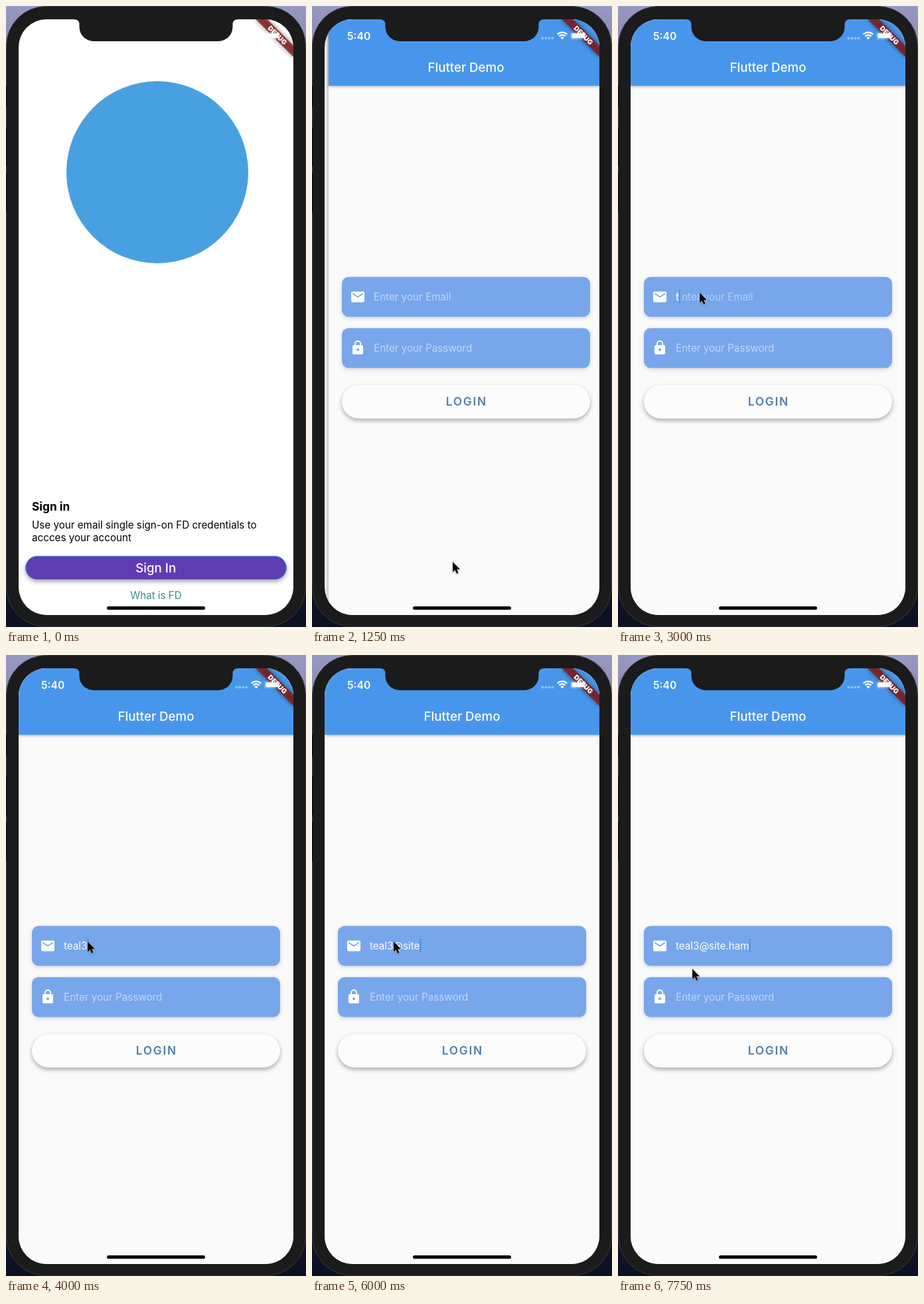
Animation of 452 by 934 pixels, one loop 8000 ms. Source, as an HTML page:

```html
<!DOCTYPE html>
<html lang="en">
<head>
<meta charset="utf-8">
<title>Sign-in flow</title>
<style>
  html, body { margin: 0; width: 100%; height: 100%; overflow: hidden; background: #14141c; }
  svg { display: block; width: 452px; height: 934px; }
  text { font-family: Inter, "Liberation Sans", sans-serif; font-size: 15.2px; white-space: pre; }
  .mid { text-anchor: middle; }
  .title { font-size: 18.7px; font-weight: 500; fill: #fff; }
  .field { fill: #78a6eb; filter: drop-shadow(0 2px 3px rgba(0, 0, 0, .15)); }
  .hint { fill: #fff; fill-opacity: .54; }
  .raised { filter: drop-shadow(0 3px 3px rgba(0, 0, 0, .32)); }
  .bar { filter: drop-shadow(0 1px 2px rgba(0, 0, 0, .32)); }
  .edge { filter: blur(4px); }
  .ribbon-shadow { filter: blur(3.5px); }
  .cursor { filter: drop-shadow(0 1px 1px rgba(0, 0, 0, .3)); }
</style>
</head>
<body>
<svg viewBox="0 0 452 934">
  <defs>
    <linearGradient id="wall" x2="0" y2="1">
      <stop stop-color="#9899c2"/>
      <stop offset=".5" stop-color="#30324f"/>
      <stop offset="1" stop-color="#0c1023"/>
    </linearGradient>
    <clipPath id="screen"><rect x="19" y="20" width="414" height="896" rx="42"/></clipPath>
    <clipPath id="pill"><rect x="29" y="827" width="394" height="36" rx="18"/></clipPath>
  </defs>

  <!-- Phone body -->
  <rect width="452" height="934" fill="url(#wall)"/>
  <rect x=".5" y=".5" width="451" height="933" rx="60" fill="#1b1b1c" stroke="#3b3b3e"/>
  <path d="M.5 120v32M.5 183v58M.5 251v59" stroke="#08080a" stroke-width="1.5"/>

  <g clip-path="url(#screen)">
    <g id="welcome">
      <rect x="19" y="20" width="414" height="896" fill="#fff"/>
      <circle cx="228" cy="250" r="137" fill="#48a0e1"/>
      <text x="39" y="759" style="font-size:17.3px;font-weight:700">Sign in</text>
      <text x="39" y="786">Use your email single sign-on FD credentials to</text>
      <text x="39" y="805">accces your account</text>
      <rect id="signIn" class="raised" x="29.5" y="827.5" width="393" height="35" rx="17.5" stroke="#459bea"/>
      <circle id="splash" cx="217" cy="838" r="11" fill="#fff" fill-opacity=".1" clip-path="url(#pill)"/>
      <text class="mid title" x="225.7" y="852">Sign In</text>
      <text class="mid" x="226" y="892" fill="#3a8f88">What is FD</text>
    </g>

    <g id="login">
      <rect class="edge" x="19" y="20" width="414" height="896" fill-opacity=".45"/>
      <rect x="19" y="20" width="414" height="896" fill="#fafafa"/>
      <rect class="bar" x="19" y="10" width="420" height="110" fill="#4896eb"/>
      <text class="mid title" x="226" y="99">Flutter Demo</text>

      <rect class="field" x="39" y="407.5" width="374" height="60" rx="10"/>
      <path transform="translate(51 425.5)" fill="#fff" d="M4 4h16a2 2 0 0 1 2 2v12a2 2 0 0 1-2 2H4a2 2 0 0 1-2-2V6a2 2 0 0 1 2-2zm16 4V6l-8 5-8-5v2l8 5z"/>
      <text id="emailHint" class="hint" x="87" y="443">Enter your Email</text>
      <text id="email" x="87" y="443" fill="#fff"></text>
      <rect id="caret" y="427" width="2" height="20" fill="#4594ee"/>

      <rect class="field" x="39" y="484.5" width="374" height="60" rx="10"/>
      <path transform="translate(51 502)" fill="#fff" fill-rule="evenodd" d="M18 8h-1V6A5 5 0 0 0 7 6v2H6a2 2 0 0 0-2 2v10a2 2 0 0 0 2 2h12a2 2 0 0 0 2-2V10a2 2 0 0 0-2-2zm-6 9a2 2 0 1 1 0-4 2 2 0 0 1 0 4zm3.1-9H8.9V6a3.1 3.1 0 0 1 6.2 0z"/>
      <text class="hint" x="87" y="520">Enter your Password</text>

      <rect class="raised" x="39" y="570" width="374" height="50.5" rx="25.2" fill="#fcfcfc"/>
      <text class="mid" x="226.8" y="601" fill="#527daa" style="font-size:17.3px;font-weight:600;letter-spacing:1.7px">LOGIN</text>
    </g>

    <!-- Debug ribbon -->
    <g transform="translate(433 20) rotate(45)">
      <rect class="ribbon-shadow" x="-40" y="28" width="80" height="12" fill-opacity=".5"/>
      <rect x="-40" y="28" width="80" height="12" fill="#871919" fill-opacity=".8"/>
      <text class="mid" y="37.7" fill="#fff" style="font-size:10.2px;font-weight:900">DEBUG</text>
    </g>

    <!-- Status bar -->
    <g fill="#fff">
      <text x="53" y="50.5" style="font-size:15.6px;font-weight:600">5:40</text>
      <g fill-opacity=".4">
        <circle cx="347.5" cy="48.5" r="2"/><circle cx="352.5" cy="48.5" r="2"/>
        <circle cx="357.5" cy="48.5" r="2"/><circle cx="362.5" cy="48.5" r="2"/>
      </g>
      <path d="M377 50.5l-2.6-2.7a3.7 3.7 0 0 1 5.2 0z"/>
      <path d="M372.4 45.6a6.5 6.5 0 0 1 9.2 0M369.7 42.6a10.3 10.3 0 0 1 14.6 0" fill="none" stroke="#fff" stroke-width="2.2"/>
      <rect x="389.5" y="39.5" width="23" height="10.5" rx="3" fill="none" stroke="#fff" stroke-opacity=".35"/>
      <rect x="391" y="41" width="20" height="7.6" rx="1.8"/>
    </g>
    <rect x="152" y="903" width="148" height="5" rx="2.5"/>
  </g>

  <path fill="#1b1b1c" d="M102 18v2q8.500 0 8.500 8v3.500a21.500 21.500 0 0 0 21.500 21.500h188a21.500 21.500 0 0 0 21.500-21.500V28q0-8 8.500-8v-2z"/>
  <path id="cursor" class="cursor" d="M0 0v15.500l3.600-3.300 2.400 5.500 2.600-1.100-2.400-5.400h4.900z" stroke="#fff" stroke-width="1" paint-order="stroke"/>
</svg>

<script>
const LOOP = 8000;
const EMAIL = "teal3@site.ham";

// Each track is a list of [start in ms, value]; values hold until the next step.
const pointer = [
  [0, null], [250, [276, 867]], [500, [232, 887]], [750, [212, 847]], [1000, [212, 836]],
  [1500, [175, 653]], [1750, [125, 440]], [2000, [123, 431]], [7750, [112, 472]]
];
const pressed = [[0, false], [1000, true]];
const pageShift = [[0, null], [1250, 6], [1500, 0]];
const typed = [
  [0, 0], [3000, 1], [3250, 2], [3500, 4], [4000, 5], [5000, 6], [5500, 8],
  [5750, 9], [6000, 10], [6500, 11], [7000, 13], [7250, 14]
];
const hintOpacity = [[0, 1], [3000, .8], [3250, 0]];
const focused = [[0, false], [2250, true]];

const $ = id => document.getElementById(id);
const valueAt = (track, t) => track.findLast(([start]) => start <= t)[1];
const show = (el, on) => el.setAttribute("visibility", on ? "visible" : "hidden");
const move = (el, x, y) => el.setAttribute("transform", `translate(${x} ${y})`);

function render(t) {
  const tip = valueAt(pointer, t);
  show($("cursor"), tip);
  if (tip) move($("cursor"), ...tip);

  const down = valueAt(pressed, t);
  $("signIn").setAttribute("fill", down ? "#6547b3" : "#5f3db1");
  show($("splash"), down);

  const shift = valueAt(pageShift, t);
  $("login").style.display = shift === null ? "none" : "";
  if (shift === null) return;
  move($("login"), shift, 0);

  const email = $("email");
  email.textContent = EMAIL.slice(0, valueAt(typed, t));
  $("emailHint").setAttribute("opacity", valueAt(hintOpacity, t));
  show($("caret"), valueAt(focused, t));
  $("caret").setAttribute("x", 87 + email.getComputedTextLength());
}

const start = performance.now();
function tick() {
  render((performance.now() - start) % LOOP);
  requestAnimationFrame(tick);
}
tick();
</script>
</body>
</html>
```
